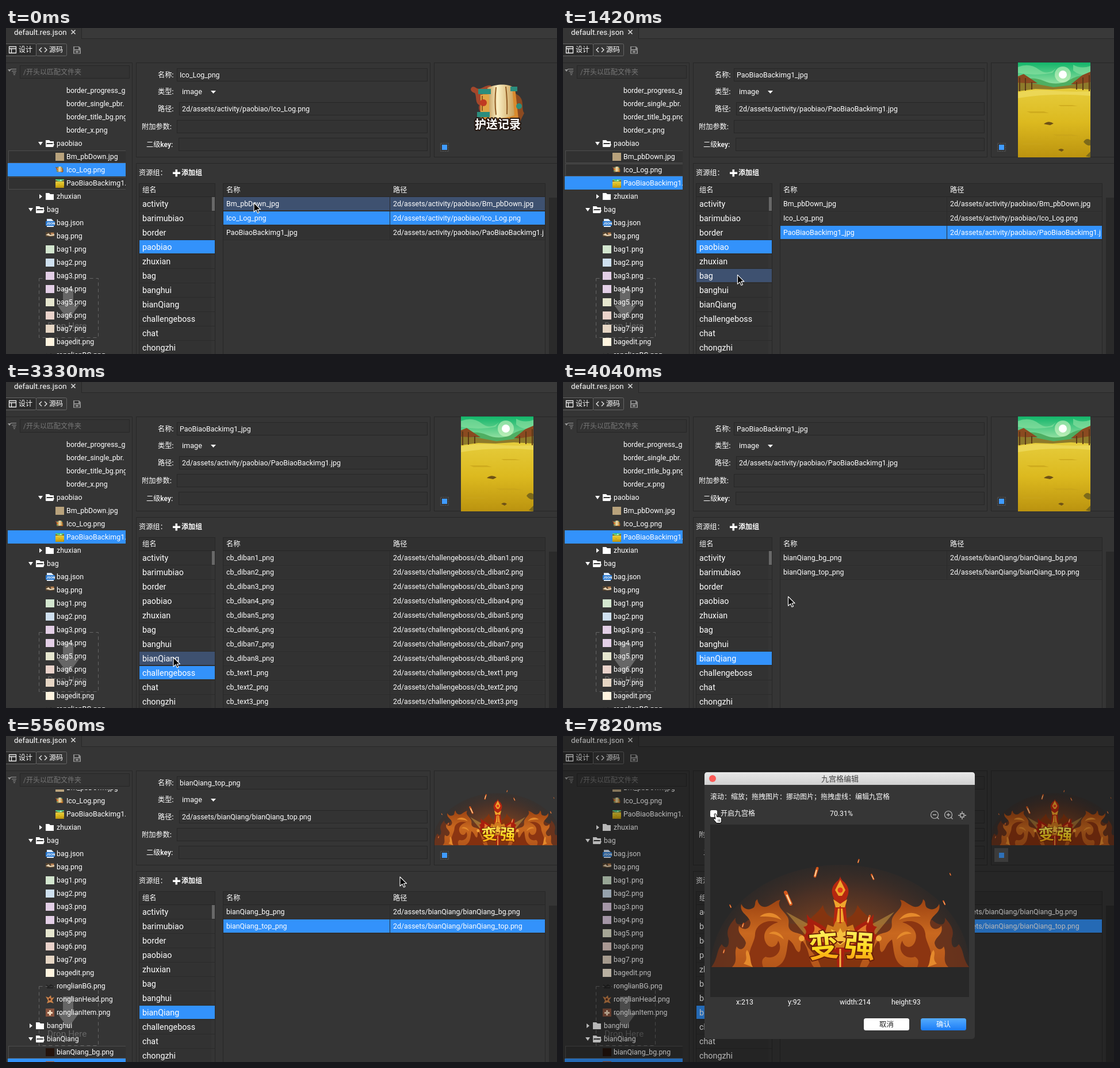
Recreate the animation shown at these times as an HTML page. Size 958x567 px, loop 8000 ms.

```html
<!DOCTYPE html>
<html lang="zh">
<head>
<meta charset="utf-8">
<title>Resource editor</title>
<style>
html, body { margin: 0; width: 100%; height: 100%; overflow: hidden; background: #353535; }
svg { display: block; }
#stage { width: 958px; height: 567px; }
text { font-family: Roboto, "Noto Sans CJK SC", "Noto Sans CJK", sans-serif; white-space: pre; }
</style>
</head>
<body>
<svg id="stage" viewBox="0 0 958 567" xmlns="http://www.w3.org/2000/svg">
<defs>
  <clipPath id="treeClip"><rect x="0" y="93" width="208" height="474"/></clipPath>
  <clipPath id="tableClip"><rect x="378" y="271" width="556" height="296"/></clipPath>
  <clipPath id="previewClip"><rect x="745" y="62" width="213" height="162"/></clipPath>
  <linearGradient id="sky" x2="0" y2="1"><stop stop-color="#12b56a"/><stop offset="1" stop-color="#b5ecb0"/></linearGradient>
  <linearGradient id="sand" x2="0" y2="1"><stop stop-color="#e6cd3c"/><stop offset=".5" stop-color="#dcb91f"/><stop offset="1" stop-color="#bb930f"/></linearGradient>
  <linearGradient id="paper"><stop stop-color="#b98d4a"/><stop offset=".4" stop-color="#fbf0c4"/><stop offset="1" stop-color="#c99f58"/></linearGradient>
  <linearGradient id="flame" x2="0" y2="1"><stop stop-color="#9c4312"/><stop offset=".5" stop-color="#c9681f"/><stop offset="1" stop-color="#b4561a"/></linearGradient>
  <linearGradient id="gold" x2="0" y2="1"><stop stop-color="#fff36a"/><stop offset=".55" stop-color="#ffd91c"/><stop offset="1" stop-color="#f58a12"/></linearGradient>
  <linearGradient id="bar" x2="0" y2="1"><stop stop-color="#e9e9e9"/><stop offset="1" stop-color="#d0d0d0"/></linearGradient>
  <linearGradient id="ok" x2="0" y2="1"><stop stop-color="#55acff"/><stop offset="1" stop-color="#1b7cf6"/></linearGradient>
  <radialGradient id="glow">
    <stop stop-color="#a8521c"/><stop offset=".45" stop-color="#7d4220" stop-opacity=".9"/>
    <stop offset=".75" stop-color="#553324" stop-opacity=".8"/><stop offset="1" stop-color="#3a2c26" stop-opacity=".35"/>
  </radialGradient>
</defs>
<g id="scene"></g>
</svg>
<script>
const BLUE = '#3392fb', HOVER = '#3e5170', EDGE = '#272727', WHITE = '#fff';
const STEP = 118.4, LOOP = 8000;
const BOLD = 'font-weight="700"', MEDIUM = 'font-weight="500"';

const rect = (x, y, w, h, fill, more = '') =>
  `<rect x="${x}" y="${y}" width="${w}" height="${h}" fill="${fill}" ${more}/>`;
const box = (x, y, w, h, stroke = EDGE, fill = 'none', more = '') =>
  rect(x + .5, y + .5, w - 1, h - 1, fill, `stroke="${stroke}" ${more}`);
const path = (d, fill, more = '') => `<path d="${d}" fill="${fill}" ${more}/>`;
const line = (d, stroke, width = 1, more = '') =>
  path(d, 'none', `stroke="${stroke}" stroke-width="${width}" ${more}`);
const circle = (x, y, r, fill, more = '') => `<circle cx="${x}" cy="${y}" r="${r}" fill="${fill}" ${more}/>`;
const text = (x, y, s, size = 12.4, fill = WHITE, more = '') =>
  `<text x="${x}" y="${y + size * .34}" font-size="${size}" fill="${fill}" ${more}>${s}</text>`;
const place = (x, y, s, body) => `<g transform="translate(${x} ${y}) scale(${s})">${body}</g>`;
const clip = (id, body) => `<g clip-path="url(#${id})">${body}</g>`;
const view = (x, y, w, h, area, body) =>
  `<svg x="${x}" y="${y}" width="${w}" height="${h}" viewBox="${area}" preserveAspectRatio="none">${body}</svg>`;

// Last value whose step has been reached
const at = (table, k) => table.filter(e => e[0] <= k).pop()[1];

const GROUPS = ['activity', 'barimubiao', 'border', 'paobiao', 'zhuxian', 'bag', 'banghui',
  'bianQiang', 'challengeboss', 'chat', 'chongzhi'];
const FILES = {
  none: [],
  paobiao: ['Bm_pbDown.jpg', 'Ico_Log.png', 'PaoBiaoBackimg1.jpg'],
  banghui: ['banghui.json', 'banghui.png', 'bg_01.png', 'bg_02.png', 'bg_03.png', 'bg_04.png',
    'bg_changjing.png', 'bg_gonggao.png', 'bg_mask.png', 'btn_orange.png', 'edit_bg.png'],
  challengeboss: [1, 2, 3, 4, 5, 6, 7, 8].map(n => `cb_diban${n}.png`)
    .concat([1, 2, 3].map(n => `cb_text${n}.png`)),
  bianQiang: ['bianQiang_bg.png', 'bianQiang_top.png']
};
const [BM, ICO, PAO] = FILES.paobiao, [QBG, QTOP] = FILES.bianQiang;
const nameOf = f => f.replace('.', '_');
const pathOf = (f, g) => `2d/assets/${g === 'paobiao' ? 'activity/' : ''}${g}/${f}`;

const groupSteps = [[0, 'paobiao'], [13, 'banghui'], [22, 'challengeboss'], [30, 'bianQiang']];
const tableSteps = [[0, 'paobiao'], [13, 'none'], [18, 'banghui'], [22, 'none'],
  [24, 'challengeboss'], [30, 'none'], [31, 'bianQiang']];
const fileSteps = [[0, ICO], [1, BM], [5, ICO], [8, PAO], [35, QTOP], [39, QBG], [42, QTOP]];
const cursorPath = [[0, 431, 304], [1, 431, 304], [3, 438, 326], [5, 438, 326], [6, 445, 351], [8, 445, 351],
  [13, 268, 449], [14, 268, 453], [16, 271, 461], [17, 271, 461], [18, 278, 458], [19, 278, 458],
  [21, 290, 503], [24, 290, 503], [28, 291, 479], [31, 291, 479], [35, 425, 338], [36, 425, 338],
  [38, 440, 310], [40, 440, 310], [42, 445, 328], [43, 445, 328], [47, 685, 245], [50, 757, 220],
  [51, 760, 207], [54, 760, 207], [60, 539, 160], [64, 136, 133], [66, 262, 134], [99, 262, 134]];

function cursorAt(k) {
  const i = cursorPath.findIndex(p => p[0] > k);
  const [a, ax, ay] = cursorPath[i - 1], [b, bx, by] = cursorPath[i];
  const u = (k - a) / (b - a);
  return [ax + (bx - ax) * u, ay + (by - ay) * u];
}

// Pictures
const scrollArt = (label = true) =>
  path('M-40,-25 C-52,-28 -46,-40 -38,-34 C-30,-28 -22,-40 -12,-38 L-8,10 C-26,18 -36,6 -32,-4 C-40,-8 -36,-18 -40,-25Z', '#a4472b') +
  path('M18,-32 L34,-22 C48,-14 40,2 46,10 L38,26 L14,24Z', '#8c4a20') +
  path('M-26,-30 L30,-34 L36,20 L-30,24Z', '#d98a2e') +
  path('M-18,-34 C0,-42 18,-40 25,-36 L29,14 C12,20 -8,20 -20,16Z', 'url(#paper)') +
  path('M-34,-32 h22 v9 h-22z M-36,8 h22 v9 h-22z M22,-36 h12 v8 h-12z', '#2b8d7d') +
  path('M-30,-22 h15 v30 h-15z', '#e0a545') +
  line('M-27,-20 v26 M-3,-35 q-3,25 0,48 M14,-36 q3,25 2,48', '#8f5a22', 2) +
  circle(-25, -8, 6, '#c03a22') + circle(37, -2, 5, '#2b8d7d') +
  (label ? `<text x="-40" y="37" font-size="20" font-weight="900" fill="#fff" stroke="#24160f" stroke-width="4" paint-order="stroke" stroke-linejoin="round">护送记录</text>` : '');

const fieldArt =
  rect(0, 0, 126, 48, 'url(#sky)') +
  path('M0,8 Q20,0 36,12 T66,10 L60,18 Q30,24 0,18Z M96,4 Q110,12 126,6 V22 Q108,24 96,14Z', '#8fe3a4', 'opacity=".6"') +
  path('M0,34 Q22,22 45,32 T90,30 T126,26 V50 H0Z', '#4fae62') +
  circle(78, 21, 14, '#e9ffd0', 'opacity=".5"') + circle(78, 21, 7, '#fff') +
  rect(0, 44, 126, 121, 'url(#sand)') +
  path('M0,24 L10,20 L34,36 H0Z M126,16 L112,22 L92,38 H126Z', '#8a4a20') +
  path('M0,35 L30,37 L62,43 L95,39 L126,34 V47 L92,45 L60,47 L30,46 L0,50Z', '#8e7a2a') +
  line('M3,26 v24 M13,27 v22 M24,34 v13 M124,22 v28 M113,26 v22 M102,34 v13', '#5b3817', 2) +
  path('M0,52 Q30,46 60,49 T126,50 L126,58 Q60,52 0,62Z', '#f0dd63', 'opacity=".7"') +
  path('M15,85 h30 l9,3 h-32z M70,74 h24 l10,2 h-30z M60,125 h34 l14,3 h-40z M10,140 h28 l6,3 h-36z', '#c9a41a', 'opacity=".7"') +
  path('M45,107 q8,-7 17,-1 l-6,3z M70,152 q5,-4 10,0 l-4,3z', '#6f5216') +
  path('M114,138 q5,-8 12,-3 v9 q-6,2 -12,-6z M118,163 l8,-8 v10z', '#7d6a1a');

const sparks = [[-86, -110, 20], [-44, -158, 14], [58, -153, 8], [31, -182, 5], [192, -160, 3],
  [-170, -70, 6], [182, -109, 6], [-203, -25, 5], [-190, -104, 4], [48, -78, 11]]
  .map(([x, y, n], i) => line(`M${x},${y} l${i % 2 ? n * .3 : -n * .45},${-n}`, '#d8591c', 1 + n / 4, 'stroke-linecap="round"') +
    line(`M${x},${y} l${i % 2 ? n * .2 : -n * .35},${-n * .8}`, '#ffd9a0', n / 7)).join('');

const wing =
  path('M-224,0 C-212,-16 -216,-28 -206,-40 C-200,-30 -192,-34 -194,-50 C-200,-66 -190,-76 -182,-86 C-184,-70 -170,-72 -160,-82 L-20,-70 L0,0Z', '#70341a', 'opacity=".85"') +
  path('M-70,0 L-64,-70 C-50,-90 -40,-92 -30,-108 C-26,-90 -16,-84 0,-84 V0Z', '#84340f') +
  path('M-188,0 C-176,-12 -186,-22 -180,-36 C-176,-28 -166,-30 -164,-42 C-166,-54 -180,-56 -176,-72 C-168,-62 -156,-66 -156,-78 C-160,-92 -176,-94 -172,-110 C-168,-100 -158,-98 -150,-104 C-146,-110 -150,-114 -144,-118 C-142,-104 -130,-102 -122,-108 C-114,-112 -112,-116 -104,-117 C-112,-106 -98,-98 -92,-88 C-86,-78 -94,-72 -86,-64 C-76,-56 -62,-62 -60,-44 C-58,-30 -40,-24 -34,0Z', 'url(#flame)') +
  path('M-152,0 C-168,-24 -148,-40 -148,-58 C-146,-76 -126,-84 -108,-78 C-128,-72 -136,-58 -130,-44 C-124,-30 -110,-34 -108,-46 C-98,-30 -112,-12 -130,-18 C-138,-14 -136,-6 -134,0Z', '#8c3511') +
  path('M-112,0 C-92,-8 -94,-28 -90,-48 C-78,-40 -80,-30 -72,-26 C-66,-30 -72,-40 -66,-46 C-52,-30 -56,-12 -46,0Z', '#84300f') +
  path('M-140,-88 C-128,-98 -112,-96 -102,-82 C-114,-88 -126,-88 -140,-88Z M-124,-58 C-116,-66 -102,-60 -98,-48 C-108,-56 -114,-58 -124,-58Z M-168,-6 C-158,-16 -168,-22 -162,-30 C-154,-20 -158,-10 -152,0Z', '#e58a2c') +
  path('M-10,-50 L-94,-96 L-44,-36Z', '#dcae48', 'opacity=".45"') +
  path('M-4,-54 C-18,-56 -24,-70 -34,-74 C-46,-82 -50,-80 -58,-92 C-58,-78 -52,-72 -64,-70 C-56,-62 -58,-56 -70,-52 C-48,-46 -44,-28 -8,-26Z', '#a81f0e') +
  path('M-6,-50 C-24,-54 -30,-66 -46,-74 C-42,-62 -48,-58 -54,-56 C-38,-50 -30,-40 -8,-36Z', '#e2782a');

const fireArt =
  `<ellipse rx="225" ry="178" fill="url(#glow)"/>` +
  wing + `<g transform="scale(-1 1)">${wing}</g>` + sparks +
  path('M0,-158 C2,-148 10,-150 14,-136 C16,-126 10,-120 9,-112 L12,-74 H-12 L-9,-112 C-10,-120 -16,-126 -14,-136 C-10,-150 -2,-148 0,-158Z', '#b52710') +
  path('M0,-152 L9,-134 L3,-124 H-3 L-9,-134Z M-12,-118 L0,-110 L12,-118 L8,-104 H-8Z M-4,-102 h8 l3,24 h-14z', '#f0a52c') +
  circle(0, -134, 4.5, '#e8361c') + line('M0,-106 V-76', '#b52710', 2) +
  path('M-26,-62 L-22,-74 L-12,-70 L-8,-80 L0,-76 L8,-80 L12,-70 L22,-74 L26,-62 L18,-40 L0,-24 L-18,-40Z', '#cf7a1e') +
  path('M-16,-66 L-4,-60 L0,-68 L4,-60 L16,-66 L11,-46 L0,-38 L-11,-46Z', '#f6bf3e') +
  path('M-12,-56 l8,3 -6,3z M12,-56 l-8,3 6,3z M-6,-45 h12 l-6,5z', '#7a2a0c') +
  path('M-8,-34 H8 L5,0 H-5Z', '#a8200f') + line('M0,-32 V0', '#f7b545', 3) +
  circle(-67, -50, 5, '#f0a43a') + circle(67, -50, 5, '#f0a43a') +
  `<g font-size="53" font-weight="900" fill="url(#gold)" stroke="#6b1f08" stroke-width="4" paint-order="stroke" stroke-linejoin="round">
   <text transform="translate(-54 -16) rotate(-5)">变</text><text transform="translate(6 -20) rotate(4)">强</text></g>`;

const previews = {
  [BM]: rect(791, 80, 126, 126, '#b9a27b') + path('M791,80 h126 l-40,34 l-86,20z', '#c8b48e') + line('M800,150 q50,-20 110,14', '#a58e66', 3),
  [ICO]: place(855, 138, 1, scrollArt()),
  [PAO]: place(791, 60, 1, fieldArt),
  [QBG]: rect(791, 62, 126, 162, '#1d120d') + path('M791,62 h126 v50 q-63,36 -126,0z', '#3f1d0f'),
  [QTOP]: clip('previewClip', view(745, 60, 213, 130, '-216 -255 418 255', fireArt))
};

// Tree: label, indent level, icon
const swatch = c => rect(0, -7, 15, 14, c);
const folder = open => path('M0,-6 h6 l2,2 h6 v3 H0Z', '#fff') +
  (open ? path('M2,1 h13 l-2,5 h-13z M0,-4 h1.500 v9 h-1.500z M12.500,-4 h1.500 v5 h-1.500z', '#fff') : rect(0, -4, 14, 10, '#fff'));
const icons = {
  json: path('M2,-7 h8 l4,4 v10 h-12z', '#dceafc') + rect(0, -3, 16, 8, '#2878d0') + text(1, 1, 'JSON', 6, '#fff', BOLD),
  sheet: rect(0, -7, 15, 8, '#55432f') + path('M0,-2 l5,-3 3,3 7,-2 v3 l-7,1z', '#e8d4b4') + rect(9, -6, 5, 3, '#b98458'),
  field: view(0, -7, 15, 15, '0 0 126 165', fieldArt),
  dark: line('M1,-2 l4,3 4,-3 5,3 M2,3 h11', '#222', 2),
  head: path('M0,-5 l5,2 4,-4 1,5 5,-2 -4,6 3,5 -6,-2 -6,2 2,-5z', '#c9824a') + circle(7, 0, 2, '#5a2c1a'),
  item: rect(0, -7, 15, 14, '#8a5540') + path('M6,-4 h3 v3 h3 v3 h-3 v3 h-3 v-3 h-3 v-3 h3z', '#f3dcc0')
};
const pastel = ['#d3e6cf', '#cfe0ef', '#e3cfe6', '#e3cfe6', '#e6e6cf', '#ead3cb', '#e6d6c4'];
const TREE = [
  ['border_progress_g', 3], ['border_single_pbr.', 3], ['border_title_bg.png', 3], ['border_x.png', 3],
  ['paobiao', 1, 'open'], [BM, 3, swatch('#b8a27c')], [ICO, 3, place(7, 0, .15, scrollArt(false))],
  [PAO, 3, icons.field], ['zhuxian', 1, 'shut'], ['bag', 0, 'open'], ['bag.json', 2, icons.json], ['bag.png', 2, icons.sheet],
  ...pastel.map((c, i) => [`bag${i + 1}.png`, 2, swatch(c)]), ['bagedit.png', 2, swatch('#fff4df')],
  ['ronglianBG.png', 2, icons.dark], ['ronglianHead.png', 2, icons.head], ['ronglianItem.png', 2, icons.item],
  ['banghui', 0, 'shut'], ['bianQiang', 0, 'open'], [QBG, 2, swatch('#24130c')], [QTOP, 2, swatch('#b4521a')]
];

function tree(k, file) {
  const scroll = k >= 35 ? 134 : 0;
  const marked = k < 13 ? FILES.paobiao : scroll ? FILES.bianQiang : [];
  return clip('treeClip', TREE.map(([label, level, icon], i) => {
    const y = 109 + 23 * i - scroll, isDir = icon === 'open' || icon === 'shut';
    const x = isDir ? 71 + 17 * level : level === 3 ? 105 : 88;
    let s = '';
    if (label === file) s += rect(3, y - 12, 205, 23, BLUE);
    else if (marked.includes(label)) s += box(4, y - 11, 215, 22, '#4d4d4d', '#313131');
    if (isDir) s += place(x - 28, y, 1, path(icon === 'open' ? 'M-4,-3 h8 l-4,6z' : 'M-2,-4 v8 l5,-4z', '#fff')) + place(x - 19, y, 1, folder(icon === 'open'));
    else if (icon) s += place(x - 19, y, 1, icon);
    return s + text(x, y, label);
  }).join(''));
}

// Parts that never change
const label = (x, y, s) => text(x, y, s, 12.2, WHITE, MEDIUM);
const chrome =
  rect(0, 0, 958, 567, '#353535') + rect(132, 0, 826, 18, '#393939') +
  line('M131.5,0 V18.5 H958', EDGE) + text(14, 7, 'default.res.json', 13.3) + line('M113.500,3.500 l7,7 m0,-7 l-7,7', '#ddd', 1.5) +
  box(-3, 27, 56, 22, '#666', '#2b2b2b', 'rx="2"') + box(52, 27, 54, 22, '#666', 'none', 'rx="2"') +
  line('M5.5,32.5 h12 v11 h-12z M5.5,36 h12 M9.5,36 v8', '#eee', 1.3) + text(22, 38, '设计', 12, WHITE, MEDIUM) +
  line('M62,34 l-4,4 4,4 M67,34 l4,4 -4,4', '#eee', 1.3) + text(75, 38, '源码', 12, WHITE, MEDIUM) +
  path('M117,32 h10 l3,3 v10 h-13z', '#8c8c8c') + rect(119, 33, 7, 4, '#353535') + rect(119, 39, 9, 5, '#353535') + rect(121, 40, 5, 3, '#8c8c8c') +
  line('M0,60.5 H219.5 V567', EDGE) + line('M8,71.5 h10 M10,75 h8 M12,78 h5 M13,81 h3', '#999', 1.2) + path('M3,72 h6 l-3,4z', '#999') +
  box(24, 65, 191, 23, EDGE, '#333') + text(30, 77, '/开头以匹配文件夹', 12, '#777') +
  line('M57.5,435.5 H160.5 V538.5 H57.5Z', '#666', 1, 'stroke-dasharray="6 5"') +
  path('M99,453 h18 v29 h10 l-19,26 -19,-26 h10z', '#666') + text(72, 518, 'Drop Here', 15.3, '#666') +
  box(226, 60, 512, 165) + box(744, 60, 220, 165) + box(226, 235, 740, 340) +
  [[297, 70], [301, 129], [297, 160], [300, 191]].map(([x, y]) => box(x, y, 733 - x, 23, EDGE, '#333')).join('') +
  label(264, 82, '名称:') + label(264, 111, '类型:') + label(264, 141, '路径:') + label(236, 172, '附加参数:') + label(244, 203, '二级key:') +
  text(306, 111, 'image', 12.7) + path('M356,109 h9 l-4.500,5z', '#fff') +
  label(231, 252, '资源组：') + path('M294.500,246 h3.500 v4.500 h5 v3.500 h-5 v4.500 h-3.500 v-4.500 h-4.500 v-3.500 h4.500z', '#fff') +
  text(305, 252, '添加组', 12, WHITE, BOLD) +
  rect(944, 295, 14, 272, '#2a2a2a') +
  box(231, 270, 133, 310) + rect(232, 271, 131, 22, '#303030') + label(237, 282, '组名') +
  box(377, 270, 561, 310) + rect(378, 271, 559, 22, '#303030') + label(383, 282, '名称') + label(673, 282, '路径') +
  line('M231,293.500 H364 M377,293.500 H938', EDGE);

const rowAt = (x, y, left, right, count) => {
  const i = Math.floor((y - 294) / 25);
  return x >= left && x < right && i >= 0 && i < count ? i : -1;
};

function groups(current, hover) {
  return rect(232, 294, 125, 273, '#323232') + rect(358, 294, 5, 25, '#686868') + GROUPS.map((g, i) => {
    const y = 306 + 25 * i, fill = g === current ? BLUE : i === hover ? HOVER : '';
    return line(`M232,${y + 12.5} H363`, '#2b2b2b') + (fill && rect(232, y - 12, 131, 23, fill)) + text(237, y, g, 14.3);
  }).join('');
}

function table(group, file, hover) {
  return FILES[group].map((f, i) => {
    const y = 306 + 25 * i, fill = f === file ? BLUE : i === hover ? HOVER : '#323232';
    return rect(378, y - 12, 559, 23, fill) + line(`M378,${y + 12.5} H937 M667.5,${y - 12} v24`, '#2b2b2b') +
      clip('tableClip', text(383, y, nameOf(f)) + text(673, y, pathOf(f, group)));
  }).join('');
}

const zoomIcon = (x, d) => circle(x, 137, 6.5, 'none', 'stroke="#bbb" stroke-width="1.2"') + line(`M${x + 4.5},141.500 l3,3 ${d}`, '#bbb', 1.3);
const dialog =
  rect(0, 0, 958, 567, '#000', 'opacity=".28"') +
  rect(246, 63, 470, 464, '#363636', 'rx="5"') + path('M246,85 V68 q0,-5 5,-5 H711 q5,0 5,5 V85Z', 'url(#bar)') +
  circle(260, 74, 6, '#fc5b57') + text(449, 75, '九宫格编辑', 13, '#404040') +
  text(256, 106, '滚动：缩放；拖拽图片：挪动图片；拖拽虚线：编辑九宫格', 12) +
  rect(256, 129, 12, 12, '#fff', 'rx="2.5"') + text(274, 135, '开启九宫格', 12) + text(464, 135, '70.31%', 12.3) +
  zoomIcon(646, 'M643,137 h6') + zoomIcon(670, 'M667,137 h6 M670,134 v6') +
  line('M691,135 h6 v6 h-6z M694,131 v3 M694,142 v3 M687,138 h3 M698,138 h3', '#bbb', 1.4) +
  rect(256, 154, 450, 300, '#282828') + view(256, 154, 450, 248, '-226 -248 450 248', fireArt) +
  [[301, 'x:213'], [391, 'y:92'], [481, 'width:214'], [571, 'height:93']].map(([x, s]) => text(x, 463, s, 12.3)).join('') +
  rect(523, 491, 79, 21, '#fff', 'rx="3.500"') + text(550, 502, '取消', 12.5, '#222') +
  rect(622, 491, 79, 21, 'url(#ok)', 'rx="3.500"') + text(649, 502, '确认', 12.5);

const arrow = path('M0,0 V16 L4,12.500 L6.500,18 L9,17 L6.500,11.500 H11.500Z', '#000', 'stroke="#fff" stroke-width="1.1" stroke-linejoin="round"');
const hand = path('M1,2 q1.500,-2 3,0 l2,5 q2,-1.500 3,0 q2,-1 2.500,.5 q2,-.5 2,2 v5 l-1.500,3 h-7 l-5,-6 q-1,-2 1.500,-2 l1.500,1z', '#fff', 'stroke="#000" stroke-linejoin="round"') +
  line('M8,11 v4 M10.500,11 v4', '#000', .8);

function scene(k) {
  const file = at(fileSteps, k), rows = at(tableSteps, k), [x, y] = cursorAt(k), open = k >= 54;
  const home = FILES.paobiao.includes(file) ? 'paobiao' : 'bianQiang';
  const groupHover = open ? -1 : rowAt(x, y, 232, 363, GROUPS.length);
  const rowHover = open ? -1 : rowAt(x, y, 378, 938, FILES[rows].length);
  return chrome + tree(k, file) + text(302, 82, nameOf(file)) + text(306, 141, pathOf(file, home)) +
    previews[file] + (k >= 51 ? rect(750, 195, 24, 24, '#525252') : '') +
    box(755, 200, 15, 15, '#555', 'none', 'stroke-dasharray="3 1"') + rect(758, 203, 9, 9, '#3f9bff') +
    groups(at(groupSteps, k), groupHover) + table(rows, file, rowHover) +
    (open ? dialog : '') + place(x, y, 1, k >= 66 ? hand : arrow);
}

const layer = document.getElementById('scene');
let shown = -1;
function tick() {
  const k = Math.floor((performance.now() % LOOP + 6) / STEP);
  if (k !== shown) layer.innerHTML = scene(shown = k);
  requestAnimationFrame(tick);
}
tick();
</script>
</body>
</html>
```
